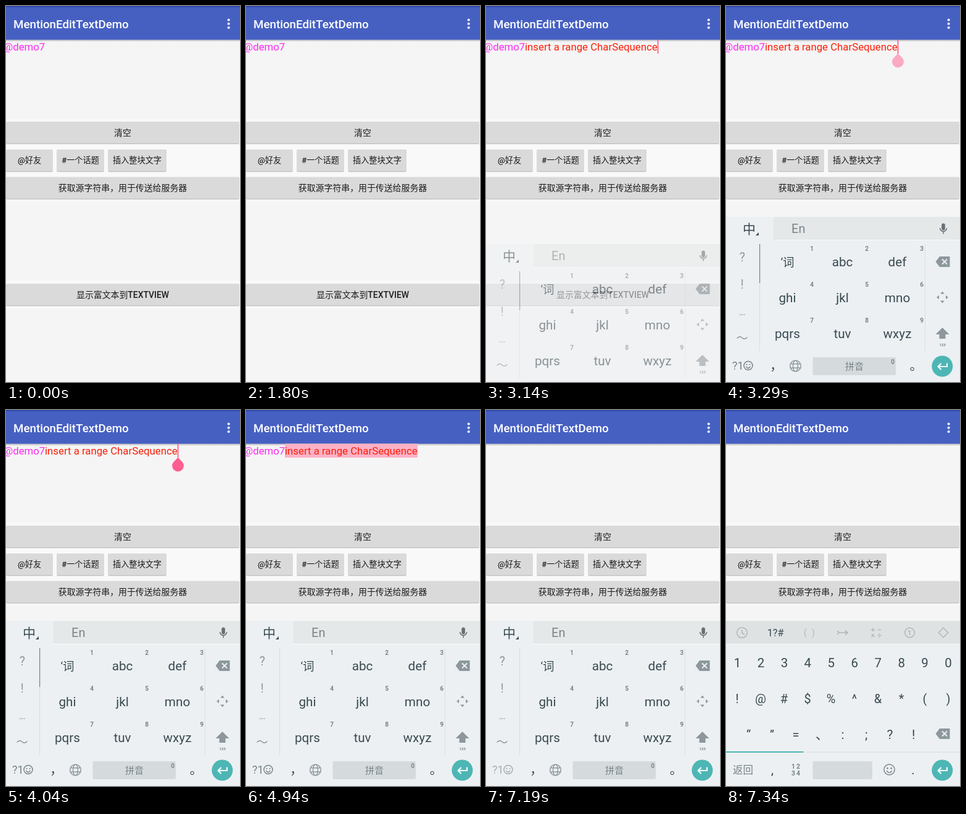
Recreate the animation shown at these times as an HTML page. Size 379x608 px, loop 8 s.

```html
<!DOCTYPE html>
<html lang="zh-CN">
<head>
<meta charset="utf-8">
<title>MentionEditTextDemo</title>
<style>
  html, body { margin: 0; width: 100%; height: 100%; overflow: hidden; background: #f9f9f9; }
  svg { display: block; width: 379px; height: 608px; }
  text { font-family: Roboto, "Noto Sans CJK SC", "Noto Sans CJK", sans-serif; white-space: pre; }
</style>
</head>
<body>
<svg id="stage" viewBox="0 0 379 608" xmlns="http://www.w3.org/2000/svg"></svg>
<script>
const LOOP = 8000;
const INK = '#3a4a52', MID = '#78848a', SOFT = '#8d989d', PALE = '#b0b7ba', TEAL = '#4db6b5';

const rect = (x, y, w, h, fill, r = 0) =>
  `<rect x="${x}" y="${y}" width="${w}" height="${h}" rx="${r}" fill="${fill}"/>`;
const text = (s, x, y, size, fill, anchor = 'middle', weight = 400) =>
  `<text x="${x}" y="${y}" font-size="${size}" fill="${fill}" text-anchor="${anchor}" font-weight="${weight}">${s}</text>`;
const fillPath = (d, fill) => `<path d="${d}" fill="${fill}"/>`;
const line = (d, color, w = 1.5) =>
  `<path d="${d}" fill="none" stroke="${color}" stroke-width="${w}"/>`;
const ring = (x, y, r, color, w = 1.5) =>
  `<circle cx="${x}" cy="${y}" r="${r}" fill="none" stroke="${color}" stroke-width="${w}"/>`;
const dot = (x, y, r, fill) => `<circle cx="${x}" cy="${y}" r="${r}" fill="${fill}"/>`;
const group = (id, body) => `<g id="${id}">${body}</g>`;
const at = (x, y, body) => `<g transform="translate(${x} ${y})">${body}</g>`;
const row = (items, x, step, y, size, fill) =>
  items.map((s, i) => text(s, x + i * step, y, size, fill)).join('');

// App screen
const button = (x, y, w, label, size) =>
  rect(x, y + 1.5, w, 35.5, '#00000010', 2.5) +
  rect(x + .3, y + 1, w - .6, 35, '#bdbdbd', 2) +
  rect(x, y, w, 35, '#dadada', 2) +
  text(label, x + w / 2, y + (size > 13.5 ? 22.8 : 22), size, '#1c1c1c');
const latin = s => `<tspan font-weight="500">${s}</tspan>`;

const screen =
  rect(0, 0, 379, 608, '#f9f9f9') +
  rect(0, 54, 379, 128.5, '#f5f5f5') +
  rect(0, 316, 379, 128, '#f5f5f5') +
  rect(0, 489, 379, 119, '#f5f5f5') +
  rect(0, 54, 379, 4, 'url(#shade)') +
  rect(0, 0, 379, 54.5, '#4660c2') +
  rect(0, 0, 379, 2, '#3049ac') +
  text('MentionEditTextDemo', 12, 35.8, 18.75, '#fff', 'start', 500) +
  [22.6, 28.8, 35].map(y => dot(360.6, y, 2, '#fff')).join('') +
  button(0, 187, 378, '清空', 13.9) +
  button(0, 232, 76, latin('@') + '好友', 13.15) +
  button(82, 232, 77, latin('#') + '一个话题', 13.15) +
  button(165, 232, 95, '插入整块文字', 13.15) +
  button(0, 276.5, 378, '获取源字符串，用于传送给服务器', 13.9) +
  button(0, 449, 378, '显示富文本到' + latin('TEXTVIEW'), 13.9);

// Edit field
const PINK = '#ff5f90', HILITE = '#fcb1c6';
const field =
  group('pickName', rect(0, 54.5, 63, 22.5, HILITE)) +
  group('pickRange', rect(63, 54.5, 215, 22.5, HILITE)) +
  group('name', text('@demo7', 63.2, 72.2, 16.75, '#fb2cf0', 'end')) +
  group('range', text('insert a range CharSequence', 63, 72.2, 16.8, '#fb2008', 'start')) +
  group('caretName', rect(63, 54.5, 1.8, 22.5, PINK)) +
  group('caretRange', rect(277.6, 54.5, 1.8, 22.5, PINK)) +
  group('handle', fillPath('M278.5 76.8L271.9 83.4A9.4 9.4 0 1 0 285.1 83.4Z', PINK));

// Shared keyboard icons
const backspace = y => at(351, y,
  fillPath('M-11.5 0L-5 -8.5H11.5V8.5H-5Z', SOFT) + line('M-1 -4L7 4M7 -4L-1 4', '#ecf0f2', 2));
const enter = dot(350.3, 582.5, 17, TEAL) +
  line('M358 577.5V583H344M348.5 578L343.5 583L348.5 588', '#fff', 2);
const smiley = (x, y, r) => at(x, y,
  ring(0, 0, r, MID) + dot(-r * .36, -r * .25, r * .16, MID) + dot(r * .36, -r * .25, r * .16, MID) +
  line(`M${-r * .5} ${r * .2}Q0 ${r} ${r * .5} ${r * .2}`, MID, 1.4));

// Letter keyboard
const keys = ['‘词', 'abc', 'def', 'ghi', 'jkl', 'mno', 'pqrs', 'tuv', 'wxyz'];
const letterKeys = keys.map((s, i) => {
  const x = 99.5 + i % 3 * 89, y = 421 + Math.floor(i / 3) * 58;
  return text(s, x, y, i ? 20.7 : 18.5, INK) +
    text(i + 1, x + 39.5, y - 25.2, 10, MID, 'middle', 700);
}).join('');
const mic = at(352, 360,
  rect(-2.8, -8.5, 5.6, 11, '#666f74', 2.8) +
  line('M-5.5 -1A5.5 5.5 0 0 0 5.5 -1M0 4.5V8.5', '#666f74'));
const arrows = at(350.5, 471, [0, 90, 180, 270].map(a =>
  `<path transform="rotate(${a})" d="M0 -9.5L3.2 -5.5H-3.2Z" fill="${SOFT}"/>`).join(''));
const globe = at(112.5, 582,
  ring(0, 0, 8.8, SOFT) + `<ellipse rx="4" ry="8.8" fill="none" stroke="${SOFT}" stroke-width="1.4"/>` +
  line('M-8 -3.2H8M-8 3.2H8', SOFT, 1.4));

const letters =
  rect(0, 341, 379, 267, '#ecf0f2') +
  rect(77, 341, 302, 37, '#e5e8e9') + rect(77, 378, 302, 1, '#f9fbfb') +
  text('中', 37.5, 368.3, 21, INK) + fillPath('M53 366V371H48Z', INK) +
  text('En', 117.3, 367.3, 20, MID) + mic +
  text('?', 26.3, 413, 19.5, SOFT) + text('!', 26.3, 457, 19.5, SOFT) +
  text('…', 26, 499.5, 16, SOFT) + text('～', 26, 544, 19, SOFT) +
  rect(54, 385, 1, 173, '#d9dee0') + rect(322, 385, 1, 173, '#d9dee0') +
  group('scroll', rect(54, 385, 1.2, 63, '#767f83')) +
  letterKeys + backspace(413.5) + arrows +
  fillPath('M350.5 520L361.5 531H355.5V538H345.5V531H339.5Z', SOFT) +
  text('123', 350.5, 550, 6.2, MID, 'middle', 700) +
  group('modeKey', text('?1', 10, 588, 18, MID, 'start') + smiley(36, 581.5, 7)) +
  text('，', 71, 588, 21, INK, 'start') + globe +
  rect(140.5, 568, 134.5, 29, '#d5dadc', 2) +
  text('拼音', 208, 587.8, 15, MID) + text('0', 270, 579, 10, MID, 'middle', 700) +
  text('。', 297.5, 588, 21, INK, 'start') + enter;

// Symbol keyboard
const tabs =
  ring(26, 360, 8.3, PALE) + line('M26 355V360.5L30 363', PALE) +
  text('1?#', 80, 366, 16.2, INK) +
  text('(', 128.5, 365, 14, PALE) + text(')', 141.5, 365, 14, PALE) +
  line('M180 357L183 360L180 363M182 360H196M193 356.5L197 360L193 363.5', PALE, 1.7) +
  line('M235 355.5H241M238 352.5V358.5M246 355.5H251M235.5 362L240.5 367M240.5 362L235.5 367M245.5 364.5H251.5', PALE, 1.3) +
  dot(248.5, 361.8, .9, PALE) + dot(248.5, 367.2, .9, PALE) +
  ring(297.5, 360, 7.8, PALE) + text('1', 297.2, 364, 11, PALE, 'middle', 700) +
  line('M352 352.3L359.7 360L352 367.7L344.3 360Z', PALE);

const symbols =
  rect(0, 341, 379, 267, '#ecf0f2') +
  rect(0, 341, 379, 37, '#dfe2e3') + rect(0, 378, 379, 1, '#f4f7f7') + tabs +
  row([...'1234567890'], 18.5, 37.95, 416, 20.5, INK) +
  row(['!', '@', '#', '$', '%', '^', '&amp;', '*', '(', ')'], 18, 38, 474, 20, INK) +
  row(['“', '”', '='], 36.5, 38.2, 531.5, 20, INK) +
  text('、', 145, 532, 21, INK, 'start') +
  row([':', ';', '?', '!'], 189, 38.2, 531.5, 21, INK) +
  backspace(523.5) +
  rect(0, 552.5, 379, 1.5, '#dfe4e5') + rect(0, 552, 125.5, 2, TEAL) +
  text('返回', 27.5, 588, 16.6, MID) + text(',', 75, 589, 21, INK) +
  row(['1', '2'], 109, 8, 580, 10.5, MID).replaceAll('"400"', '"700"') +
  row(['3', '4'], 109, 8, 591, 10.5, MID).replaceAll('"400"', '"700"') +
  rect(140.5, 568, 96.5, 29, '#d5dadc', 2) +
  smiley(264.5, 581.5, 8.6) + text('.', 303, 589, 21, INK) + enter;

document.getElementById('stage').innerHTML =
  `<defs><linearGradient id="shade" x2="0" y2="1">
    <stop stop-color="#a9abb5"/><stop offset="1" stop-color="#f5f5f5"/>
  </linearGradient></defs>` +
  screen + field + group('letters', letters) + group('symbols', symbols);

// Each step holds its value until the next one.
function play(id, steps, prop = 'opacity') {
  const frames = steps.map(([t, v]) => ({ offset: t / LOOP, [prop]: v, easing: 'steps(1, end)' }));
  frames.push({ offset: 1, [prop]: steps.at(-1)[1] });
  document.getElementById(id).animate(frames, { duration: LOOP, iterations: Infinity }).startTime = 0;
}
// Visibility that flips at every listed time.
const toggle = (id, on, ...times) =>
  play(id, [[0, on], ...times.map((t, i) => [t, (on + i + 1) % 2])]);

const start = document.timeline.currentTime || 0;
toggle('name', 1, 6290);
toggle('range', 0, 1950, 5090);
toggle('pickRange', 0, 4190, 5090);
toggle('pickName', 0, 5690, 6290);
toggle('caretName', 0, 300, 900, 1350, 1800, 5090, 5690);
toggle('caretRange', 0, 1950, 2540, 2990, 3590, 4040, 4190);
toggle('symbols', 0, 7340);
play('handle', [[0, 0], [3290, .5], [3440, 1], [4190, .5], [4340, 0]]);
play('letters', [[0, 0], [3140, .58], [3290, 1], [7340, 0]]);
play('letters', [[0, 'translateY(44px)'], [3290, 'translateY(0px)']], 'transform');
play('scroll', [[0, 1], [4790, .5], [4940, 0]]);
play('modeKey', [[0, 1], [7190, .6], [7340, 1]]);
document.getAnimations().forEach(a => { a.startTime = start; });
</script>
</body>
</html>
```
